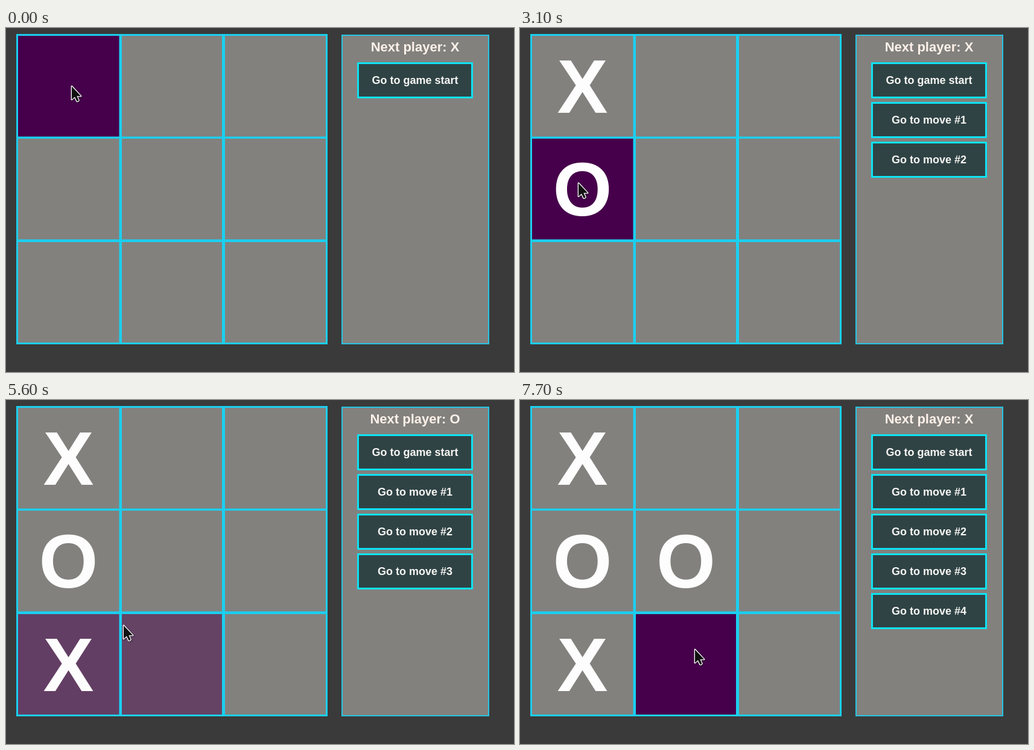
An HTML page with a canvas that plays this animation: 842x572 px, repeating every 8000 ms.

```html
<!DOCTYPE html>
<html lang="en">
<head>
<meta charset="utf-8">
<title>Tic-tac-toe</title>
<style>
  html, body { margin: 0; height: 100%; overflow: hidden; background: #3a3a3a; }
  canvas { display: block; }
</style>
</head>
<body>
<canvas id="stage" width="842" height="572"></canvas>
<script>
const ctx = document.getElementById('stage').getContext('2d');
const LOOP = 8000, TICK = 100, FADE = 200;
const GREY = [130, 129, 126], PURPLE = [70, 0, 75];

const columns = [[20, 187.5], [192, 358], [363, 530]];
const rows = [[13, 180.5], [184, 351.5], [356, 523]];
const markX = [103.5, 275, 446.5];
const markBaseline = [141, 312, 484];

// Cells are numbered 0-8, row by row.
const moves = [
  { at: 1200, cell: 0 }, { at: 3100, cell: 3 },
  { at: 4800, cell: 6 }, { at: 6600, cell: 4 },
];
const hovers = [
  { at: -1000, cell: 0 }, { at: 2200, cell: 3 }, { at: 3820, cell: 6 },
  { at: 5543, cell: 7 }, { at: 5735, cell: 4 }, { at: 7340, cell: 7 },
];
// Each run advances one point per tick, then rests on its last point.
const pointerRuns = [
  { at: 0, points: [[109, 97]] },
  { at: 1900, points: [[107, 119]] },
  { at: 2100, points: [[106, 147], [105, 184], [104, 208], [100, 236], [97, 247]] },
  { at: 2900, points: [[97, 258]] },
  { at: 3600, points: [[97, 272], [97, 305], [97, 342], [97, 364], [97, 401]] },
  { at: 4200, points: [[97, 412]] },
  { at: 5400, points: [[115, 405], [165, 388], [195, 375], [235, 360], [275, 332], [298, 300], [304, 286]] },
  { at: 6300, points: [[306, 286]] },
  { at: 7100, points: [[305, 292], [303, 312], [299, 342], [295, 372], [292, 395], [291, 409], [290, 415]] },
];
const arrow = new Path2D('M0 0V22L5 17.4L8.4 24.6Q10 25.6 11.6 23.2L8.4 16.3H15.2Z');

// CSS "ease": cubic-bezier(.25, .1, .25, 1)
function ease(x) {
  if (x <= 0) return 0;
  if (x >= 1) return 1;
  const bezier = (a, b, s) => 3 * a * s * (1 - s) ** 2 + 3 * b * s * s * (1 - s) + s ** 3;
  let low = 0, high = 1;
  for (let i = 0; i < 20; i++) {
    const mid = (low + high) / 2;
    if (bezier(.25, .25, mid) < x) low = mid; else high = mid;
  }
  return bezier(.1, 1, low);
}

function hoverAmount(cell, time) {
  return hovers.reduce((sum, hover, i) => {
    if (hover.cell !== cell) return sum;
    const left = hovers[i + 1]?.at ?? Infinity;
    return sum + ease((time - hover.at) / FADE) - ease((time - left) / FADE);
  }, 0);
}

function rect(x, y, w, h, color) {
  ctx.fillStyle = color;
  ctx.fillRect(x, y, w, h);
}

function framed(x, y, w, h, border, line, fill) {
  rect(x, y, w, h, line);
  rect(x + border, y + border, w - 2 * border, h - 2 * border, fill);
}

function label(text, x, baseline, size, color) {
  ctx.font = `bold ${size}px "Liberation Sans", Arial, sans-serif`;
  ctx.textAlign = 'center';
  ctx.fillStyle = color;
  ctx.fillText(text, x, baseline);
}

function drawBoard(time, played) {
  rect(17, 10, 516, 516, '#1bcff0');
  for (let cell = 0; cell < 9; cell++) {
    const col = cell % 3, row = Math.floor(cell / 3);
    const [x0, x1] = columns[col], [y0, y1] = rows[row];
    const hover = hoverAmount(cell, time);
    const color = GREY.map((g, i) => Math.round(g + (PURPLE[i] - g) * hover));
    rect(x0, y0, x1 - x0, y1 - y0, `rgb(${color})`);
    const turn = played.findIndex(move => move.cell === cell);
    if (turn >= 0) {
      label('XO'[turn % 2], markX[col], markBaseline[row], 126, hover > .9 ? '#fff' : '#fdfdfd');
    }
  }
}

function drawPanel(count) {
  framed(556, 11, 245, 515, 2, '#26c5e5', `rgb(${GREY})`);
  label(`Next player: ${'XO'[count % 2]}`, 678, 39, 22, '#fdf1e9');
  for (let i = 0; i <= count; i++) {
    const y = 57 + 66 * i;
    framed(582, y, 192, 60, 3, '#0ee3f4', '#2f4345');
    label(i ? `Go to move #${i}` : 'Go to game start', 678, y + 36, 18, '#f8f6f3');
  }
}

function drawPointer(time) {
  const run = pointerRuns.findLast(r => r.at <= time);
  const step = Math.min(run.points.length - 1, Math.floor((time - run.at) / TICK));
  ctx.save();
  ctx.translate(...run.points[step]);
  ctx.lineJoin = 'round';
  ctx.lineWidth = 2.6;
  ctx.strokeStyle = '#fff';
  ctx.shadowColor = 'rgba(0, 0, 0, .5)';
  ctx.shadowBlur = 2;
  ctx.shadowOffsetX = ctx.shadowOffsetY = 1;
  ctx.stroke(arrow);
  ctx.shadowColor = 'transparent';
  ctx.fillStyle = '#111';
  ctx.fill(arrow);
  ctx.restore();
}

function draw(now) {
  // The screen refreshes ten times a second.
  const time = Math.floor((now % LOOP) / TICK) * TICK;
  const played = moves.filter(move => move.at <= time);
  rect(0, 0, 842, 572, '#3a3a3a');
  drawBoard(time, played);
  drawPanel(played.length);
  drawPointer(time);
}

let start;
function frame(now) {
  start ??= now;
  draw(now - start);
  requestAnimationFrame(frame);
}
requestAnimationFrame(frame);
</script>
</body>
</html>
```
